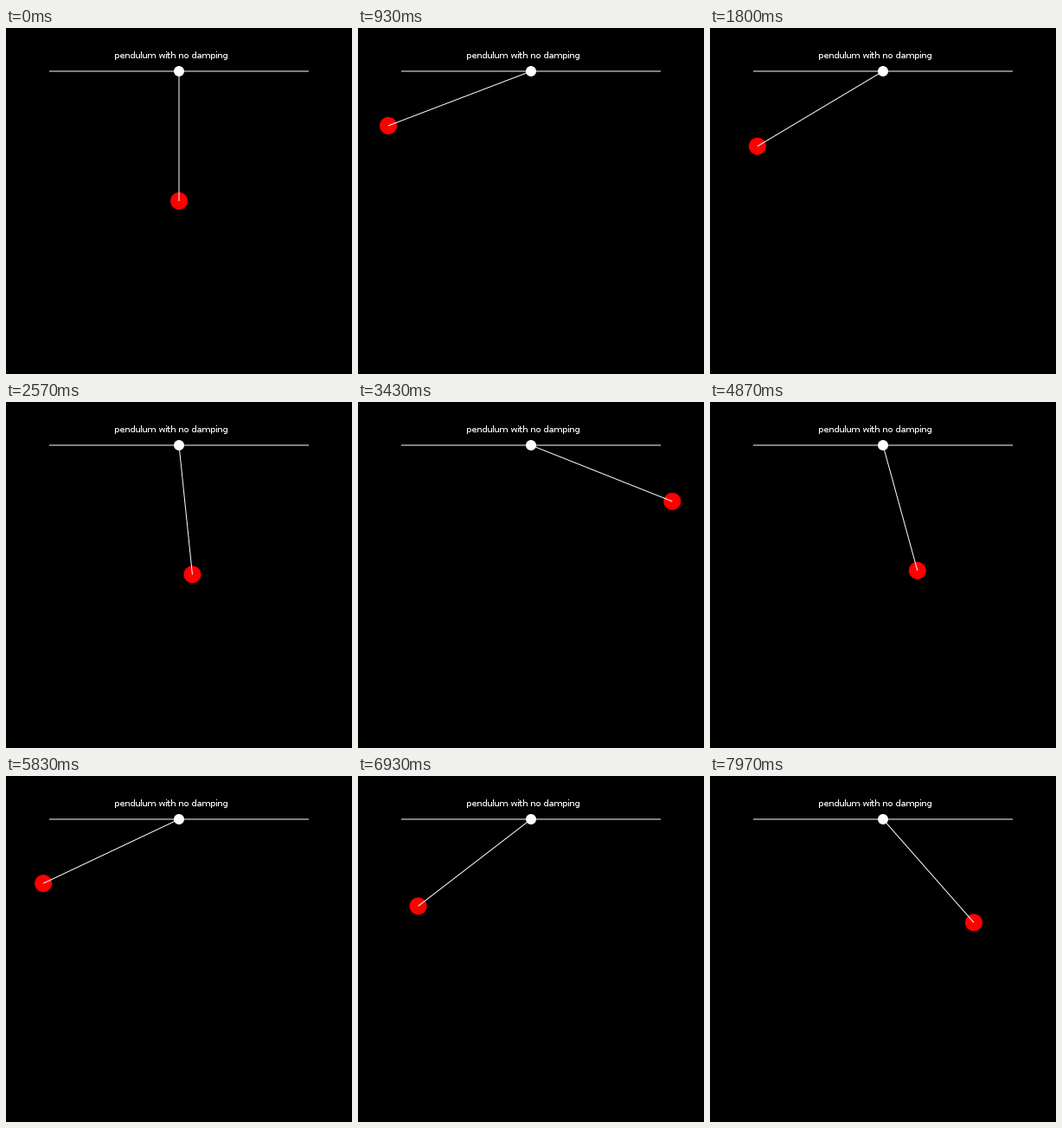
Animation of 400x400 px, one loop 8000 ms. Source, as a matplotlib script:

```python
import math

import matplotlib.pyplot as plt
from matplotlib.animation import FuncAnimation
from matplotlib.patches import Circle

SIZE, DPI = 400, 100
LOOP_MS, TICK_MS = 8000, 10
STEPS = 240                     # poses per loop, each held for 30 or 40 ms
ARM = 200                       # radius of the swing around (200, 0)
PIVOT = (200, 50)
KNOT = 7                        # poses between two solved positions
RATE = 2 * math.pi / 140.22     # small-angle frequency per pose
SWING = 1.0508                  # largest angle in radians
PX = 72 / DPI                   # one pixel in points


def solve(count, substeps=70):
    """Integrate the undamped pendulum and return one position per knot."""
    dt = KNOT / substeps
    angle, speed = 0.0, -2 * RATE * math.sin(SWING / 2)
    points = []
    for _ in range(count):
        points.append((200 + ARM * math.sin(angle), ARM * math.cos(angle)))
        for _ in range(substeps):
            mid = angle + speed * dt / 2
            speed -= RATE ** 2 * math.sin(mid) * dt
            angle = mid + speed * dt / 2
    return points


knots = solve(STEPS // KNOT + 2)


def position(step):
    """Bob position, moving straight from one knot to the next."""
    i, part = divmod(step, KNOT)
    (x0, y0), (x1, y1) = knots[i], knots[i + 1]
    u = part / KNOT
    return x0 + (x1 - x0) * u, y0 + (y1 - y0) * u


plt.rcParams.update({
    "font.family": "DejaVu Sans",
    "text.hinting": "default",
    "text.hinting_factor": 1,
    "path.snap": False,
})

fig = plt.figure(figsize=(SIZE / DPI, SIZE / DPI), dpi=DPI, facecolor="black")
ax = fig.add_axes([0, 0, 1, 1])
ax.set_xlim(0, SIZE)
ax.set_ylim(SIZE, 0)
ax.axis("off")


def line(xs, ys, z):
    return ax.plot(xs, ys, color="white", lw=PX, solid_capstyle="butt",
                   snap=False, zorder=z)[0]


bob = ax.add_patch(Circle((200, 200), 10, fc="red", lw=0, zorder=1))
rod = line([200, 200], [50, 200], 2)
line([50, 350], [50, 50], 3)
ax.add_patch(Circle(PIVOT, 6, fc="white", lw=0, zorder=4))
ax.text(125, 35, "pendulum with no damping", color="white", fontsize=10 * PX,
        ha="left", va="baseline")


def draw(tick):
    # 30 poses a second, each starting on the nearest tick
    step = min((2 * tick + 1) * 3 // 20, STEPS - 1)
    x, y = position(step)
    bob.center = x, y
    rod.set_data([PIVOT[0], x], [PIVOT[1], y])
    return bob, rod


anim = FuncAnimation(fig, draw, frames=LOOP_MS // TICK_MS, interval=TICK_MS,
                     init_func=lambda: draw(0), repeat=True, repeat_delay=0)
plt.show()
```
